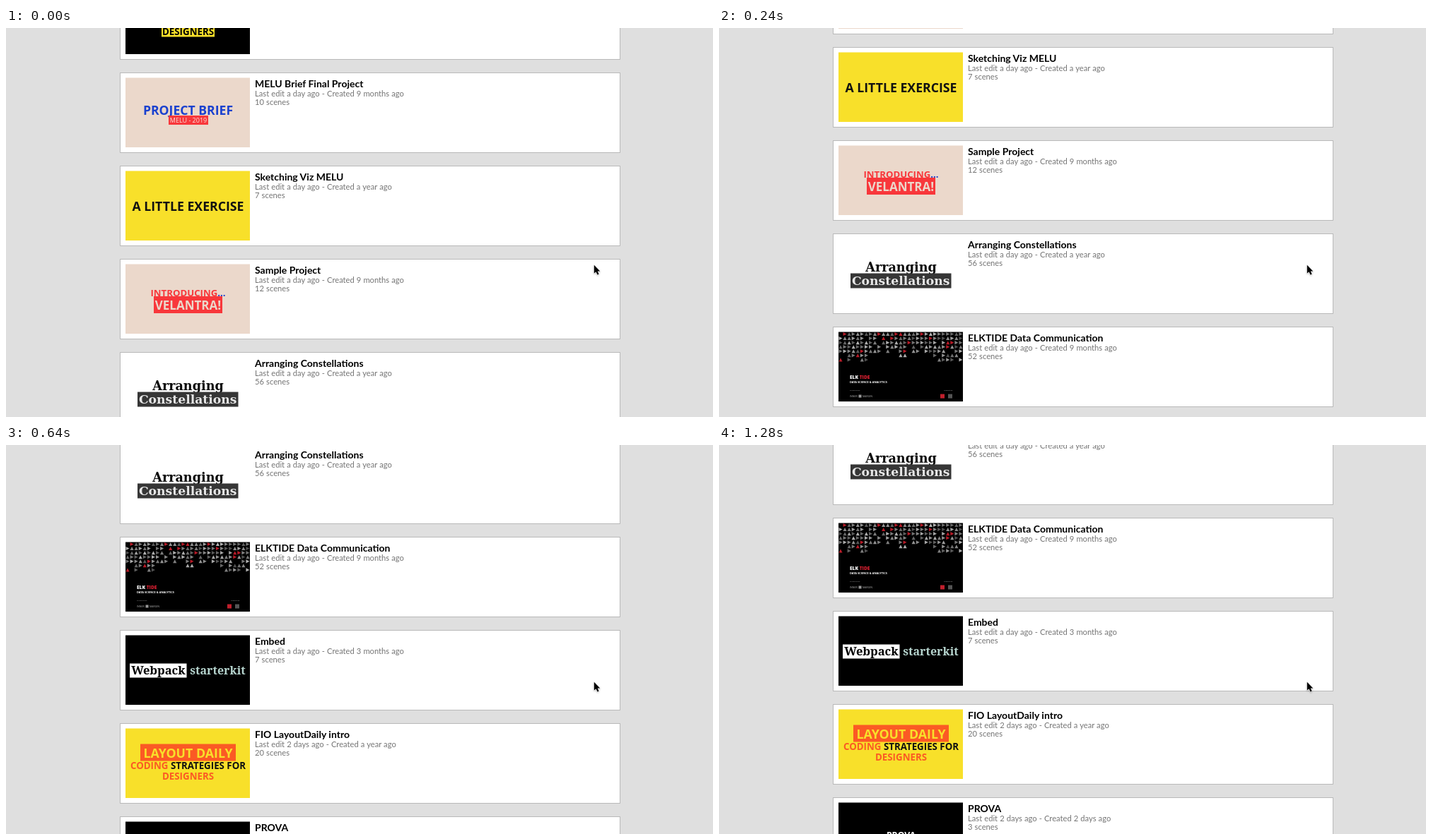
Animation of 1000 by 551 pixels, one loop 1.36 s. Source, as an HTML page:

```html
<!DOCTYPE html>
<html lang="en">
<head>
<meta charset="utf-8">
<title>Project list</title>
<style>
  html, body { margin: 0; width: 100%; height: 100%; overflow: hidden; background: #dfdfdf; }
  svg { display: block; }
  .frame { fill: #fff; stroke: #b9b9b9; }
  .title { font: 700 14px Lato, sans-serif; fill: #000; }
  .meta { font: 400 11.2px Lato, sans-serif; word-spacing: .2px; fill: #757575; }
  .sans { font-family: "Open Sans", sans-serif; }
  .serif { font-family: "DejaVu Serif", serif; }
  .fat { font-family: "Noto Serif", serif; }
</style>
</head>
<body>
<svg width="1000" height="551" viewBox="0 0 1000 551">
  <g id="list"></g>
  <path d="M831.8 335.8V347.6L834.5 345.2L836.5 349.6L838.6 348.7L836.7 344.4H840.3Z"
        fill="#000" stroke="#fff" stroke-width="1" paint-order="stroke"
        style="filter: drop-shadow(0 1px 1px #0004)"/>
</svg>
<script>
const PITCH = 132;
const FIRST_TOP = -69;
const THUMB = { w: 176, h: 98.5 };
const BLACK = '#000', YELLOW = '#f8e02a', SAND = '#ebd8cb';
const RED = '#f8373b', ORANGE = '#fb5a24', BLUE = '#1a41cf';

const rect = (x, y, w, h, fill) =>
  `<rect x="${x}" y="${y}" width="${w}" height="${h}" fill="${fill}"/>`;

const label = (x, y, size, fill, text, { weight = 700, face = 'sans', anchor = 'middle' } = {}) =>
  `<text x="${x}" y="${y}" class="${face}" font-size="${size}" font-weight="${weight}" ` +
  `fill="${fill}" text-anchor="${anchor}">${text}</text>`;

const span = (fill, text) => `<tspan fill="${fill}">${text}</tspan>`;

function seeded(seed) {
  return () => (seed = (seed * 16807) % 2147483647) / 2147483647;
}

// Triangles thin out downwards and stop at a wavy arch.
function triangles() {
  const rand = seeded(77);
  const cols = 29;
  const step = THUMB.w / cols;
  let out = '';
  for (let row = 0; row < 8; row++) {
    for (let col = 0; col < cols; col++) {
      const x = col * step, y = row * step;
      const u = x / 88 - 1;
      const edge = 27 + 20 * u * u + 5 * Math.cos(3 * Math.PI * u);
      const chance = rand(), tone = rand(), flip = rand() < .4;
      if (y > edge || chance < .05 + .3 * y / edge) continue;
      const grey = Math.round(70 + 110 * tone);
      const fill = tone < .08 ? '#b81a27' : `rgb(${grey},${grey},${grey})`;
      const shape = flip
        ? `M${x + .4} ${y + 5.5}h5.2l-2.6-5z`
        : `M${x + .5} ${y + .4}v5.2l5-2.6z`;
      out += `<path d="${shape}" fill="${fill}"/>`;
    }
  }
  return out;
}

const tiny = { anchor: 'start', weight: 400 };

const cards = [
  { title: '', meta: '', scenes: '', bg: BLACK,
    art: rect(51, 57, 75, 17, YELLOW) + label(88.5, 71, 13.3, BLACK, 'DESIGNERS') },

  { title: 'MELU Brief Final Project', meta: 'a day ago - Created 9 months ago', scenes: 10, bg: SAND,
    art: label(88.5, 52, 17.6, BLUE, 'PROJECT BRIEF') + rect(61, 53.5, 56, 13, RED) +
      label(89, 63.5, 9, '#fbe3da', 'MELU - 2019', { weight: 400 }) },

  { title: 'Sketching Viz MELU', meta: 'a day ago - Created a year ago', scenes: 7, bg: YELLOW,
    art: label(88.5, 56.5, 17.7, '#111', 'A LITTLE EXERCISE') },

  { title: 'Sample Project', meta: 'a day ago - Created 9 months ago', scenes: 12, bg: SAND,
    art: label(88.5, 45.5, 13.2, RED, 'INTRODUCING' + span(BLUE, '...')) +
      rect(40, 45.5, 97, 24, RED) + label(88.5, 64.5, 17, SAND, 'VELANTRA!') },

  { title: 'Arranging Constellations', meta: 'a day ago - Created a year ago', scenes: 56, bg: '#fff',
    art: label(88.5, 46, 17.6, '#0a0a0a', 'Arranging', { face: 'serif' }) +
      rect(17, 49, 142.5, 21, '#363636') +
      label(88.2, 65.3, 17.2, '#e6e6e6', 'Constellations', { face: 'serif' }) },

  { title: 'ELKTIDE Data Communication', meta: 'a day ago - Created 9 months ago', scenes: 52, bg: BLACK,
    art: triangles() +
      label(16, 66.5, 6.6, '#fff', 'ELK ' + span('#d81f30', 'TIDE'), { anchor: 'start', weight: 800 }) +
      label(16, 72, 3.9, '#fff', 'DATA SCIENCE &amp; ANALYTICS', { anchor: 'start' }) +
      label(16, 83.5, 2.5, '#aaa', 'Produced by', tiny) +
      label(149, 83.5, 2.5, '#aaa', 'Supported', tiny) +
      label(16, 92.5, 3.6, '#aaa', 'INNER', tiny) + rect(28.5, 89, 4, 4, '#999') +
      label(34, 92.5, 3.6, '#aaa', 'MARGIN', tiny) +
      rect(144, 88, 6, 6, '#c01f2c') + rect(155, 88, 6, 6, '#555') },

  { title: 'Embed', meta: 'a day ago - Created 3 months ago', scenes: 7, bg: BLACK,
    art: rect(6, 40, 80.5, 20, '#fff') +
      label(46.5, 55, 16.5, BLACK, 'Webpack', { face: 'fat', weight: 900 }) +
      label(130.5, 55, 16, '#b5d3cd', 'starterkit', { face: 'fat' }) },

  { title: 'FIO LayoutDaily intro', meta: '2 days ago - Created a year ago', scenes: 20, bg: YELLOW,
    art: rect(21, 22, 135, 24, ORANGE) +
      label(88.5, 41, 17.8, YELLOW, 'LAYOUT DAILY') +
      label(88.5, 57.3, 13.3, '#111', span(ORANGE, 'CODING') + ' STRATEGIES FOR') +
      label(88.5, 72.3, 13.3, ORANGE, 'DESIGNERS') },

  { title: 'PROVA', meta: '2 days ago - Created 2 days ago', scenes: 3, bg: BLACK,
    art: label(88.5, 50, 12.2, '#fff', 'PROVA') },
];

const list = document.getElementById('list');
list.innerHTML = cards.map((card, i) => `
  <g transform="translate(161 ${FIRST_TOP + i * PITCH})">
    <rect class="frame" x=".5" y=".5" width="707" height="113"/>
    <g transform="translate(8 7.5)">${rect(0, 0, THUMB.w, THUMB.h, card.bg)}${card.art}</g>
    ${card.title && `<text class="title" x="191" y="20.5">${card.title}</text>
    <text class="meta" x="191" y="33.8">Last edit ${card.meta}</text>
    <text class="meta" x="191" y="46">${card.scenes} scenes</text>`}
  </g>`).join('');

// Scroll position for every 80 ms step, held until the next one.
const STEP = 80;
const scroll = [0, 28, 84, 168, 260, 332, 392, 432, 461, 476, 484, 486, 487, 487.5, 488, 488, 488];
const shift = y => `translateY(${-y}px)`;
const keys = scroll.map((y, i) => ({
  offset: i / scroll.length, transform: shift(y), easing: 'step-end',
}));
keys.push({ offset: 1, transform: shift(scroll.at(-1)) });
list.animate(keys, { duration: STEP * scroll.length, iterations: Infinity });
</script>
</body>
</html>
```
